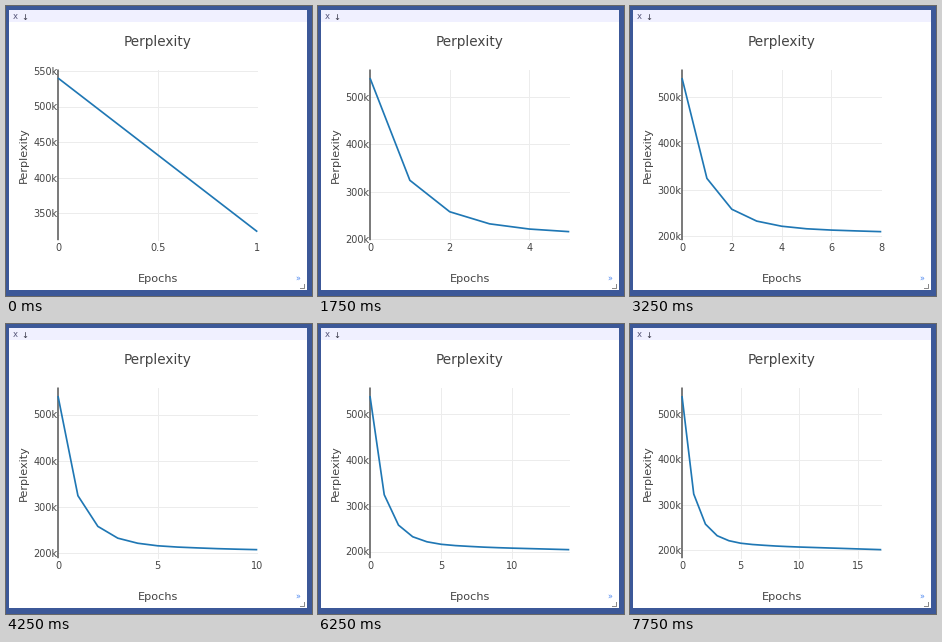
These frames come from a looping animation (306x290 px, 8000 ms). A matplotlib script:

```python
import math

import matplotlib.pyplot as plt
from matplotlib.animation import FuncAnimation
from matplotlib.patches import Rectangle

W, H, DPI = 306, 290, 100
STEP = 250                                # ms per frame
FRAMES = 32
LEFT, RIGHT, TOP, BOTTOM = 52, 251.3, 63.5, 234.2
PAD = (BOTTOM - TOP) / 20

INK = "#444444"
GRID = "#ececec"
BLUE = "#1f77b4"

# Perplexity in thousands; the tail falls almost linearly.
VALUES = [540.2, 324.4, 258, 232.5, 221.5, 216, 213.2, 211.4, 209.8, 208.6]
VALUES += [207.6 - 0.83 * i for i in range(8)]

plt.rcParams["font.family"] = "DejaVu Sans"


def pt(px):
    return px * 72 / DPI


fig = plt.figure(figsize=(W / DPI, H / DPI), dpi=DPI)
ax = fig.add_axes([0, 0, 1, 1])
ax.set_xlim(0, W)
ax.set_ylim(H, 0)
ax.axis("off")


def box(x, y, w, h, color):
    ax.add_patch(Rectangle((x, y), w, h, fc=color, lw=0, zorder=0))


def label(x, y, text, size, color=INK, ha="center", **kw):
    return ax.text(x, y, text, fontsize=pt(size), color=color, ha=ha,
                   va=kw.pop("va", "baseline"), **kw)


def line(xs, ys, color, width, **kw):
    return ax.plot(xs, ys, color=color, lw=pt(width), **kw)[0]


def draw_window():
    box(0, 0, W, H, "#3c5898")
    box(3, 4, 298, 280, "white")
    box(3, 4, 298, 12, "#f0f0ff")
    label(9, 13, "x", 8.5, "#55557a")
    label(19, 14, "↓", 8.5, "#333344")
    label(152, 40, "Perplexity", 13.6)
    label(152, 276, "Epochs", 11.2)
    label(17.5, 149, "Perplexity", 11.2, rotation=90, va="center")
    label(291.5, 276, "»", 8, "#4a86f0")
    line([293.5, 297.5, 297.5], [281.5, 281.5, 277.5], "#8a8a8a", 1)
    line([LEFT, LEFT], [TOP, BOTTOM], INK, 1.4, zorder=3, snap=False,
         solid_capstyle="butt")


def nice_step(rough):
    base = 10 ** math.floor(math.log10(rough) + 1e-9)
    return base * next(m for m in (2, 5, 10) if m > rough / base + 1e-9)


def ticks(lo, hi, parts):
    step = nice_step((hi - lo) / parts)
    first = math.ceil(lo / step - 1e-9)
    last = math.floor(hi / step + 1e-9)
    return [i * step for i in range(first, last + 1)]


draw_window()
curve = line([], [], BLUE, 1.7, zorder=4, solid_capstyle="butt",
             solid_joinstyle="round")
parts = []


def last_epoch(t):
    return 1 if t < 250 else 2 + (t - 250) // 500


def update(frame):
    for part in parts:
        part.remove()
    parts.clear()

    n = last_epoch(frame * STEP)
    high, low = VALUES[0], VALUES[n]
    scale = (BOTTOM - TOP - 2 * PAD) / (high - low)

    def px(v):
        return LEFT + v / n * (RIGHT - LEFT)

    def py(v):
        return TOP + PAD + (high - v) * scale

    for v in ticks(0, n, 5):
        x = px(v)
        if LEFT + 0.8 < x < RIGHT - 0.8:
            parts.append(line([x, x], [TOP, BOTTOM], GRID, 1, zorder=1))
        parts.append(label(x, 245, f"{v:g}", 9.8))

    for v in ticks(low - PAD / scale, high + PAD / scale, 5.25):
        y = py(v)
        if TOP + 0.8 < y < BOTTOM - 0.8:
            parts.append(line([LEFT, RIGHT], [y, y], GRID, 1, zorder=1))
        parts.append(label(51.5, y + 3.8, f"{v:.0f}k", 9.8, ha="right"))

    curve.set_data([px(i) for i in range(n + 1)],
                   [py(v) for v in VALUES[:n + 1]])
    return [curve, *parts]


anim = FuncAnimation(fig, update, frames=FRAMES, interval=STEP,
                     init_func=lambda: update(0), repeat=True,
                     repeat_delay=0, blit=False)
plt.show()
```
